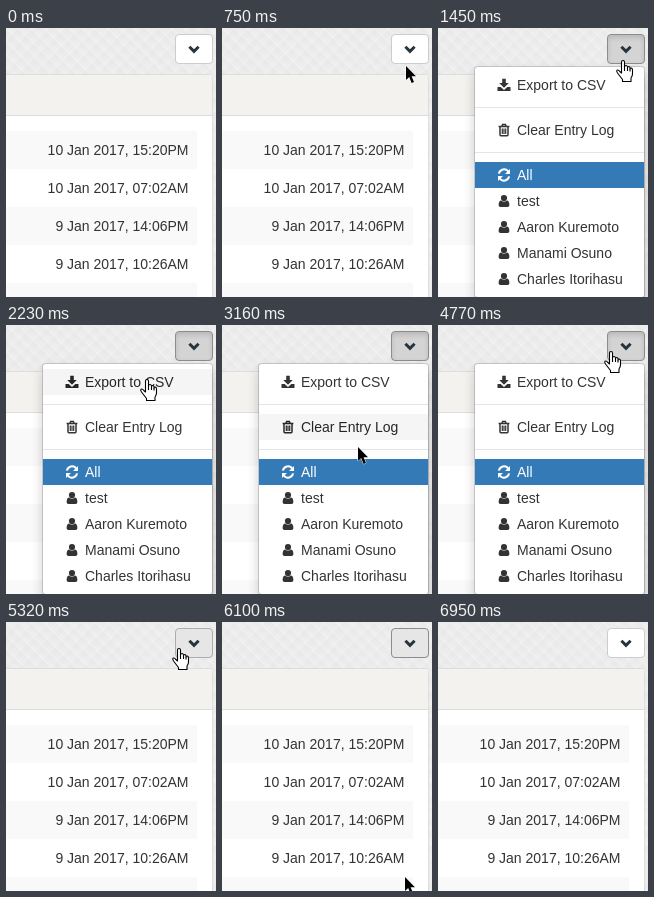
Animation of 210x269 px, one loop 7.1 s. Source, as an HTML page:

```html
<!DOCTYPE html>
<html lang="en">
<head>
<meta charset="utf-8">
<title>Entry log menu</title>
<style>
  html, body { margin: 0; width: 100%; height: 100%; overflow: hidden; }
  body {
    position: relative;
    font: 14px/20px "Liberation Sans", Arial, sans-serif;
    color: #333;
    background:
      repeating-linear-gradient(45deg, rgba(255,255,255,.14) 0 2px, transparent 2px 5px, rgba(0,0,0,.008) 5px 9px),
      repeating-linear-gradient(-45deg, rgba(255,255,255,.1) 0 2px, transparent 2px 6px, rgba(0,0,0,.008) 6px 11px),
      #ededed;
  }
  body * { box-sizing: border-box; }
  svg { position: absolute; overflow: visible; }

  .panel {
    position: absolute; left: -20px; top: 46px; width: 227px; height: 240px;
    background: #fff; border: 1px solid #ddd; border-radius: 4px; overflow: hidden;
  }
  .head { height: 41px; background: #f3f2ee; border-bottom: 1px solid #ddd; }
  .log { position: absolute; left: 0; top: 56px; width: 210px; }
  .log div { height: 38px; padding: 9px 8.5px 9px 0; text-align: right; white-space: nowrap; }
  .log div:nth-child(odd) { background: #f9f9f9; }

  .btn {
    position: absolute; left: 169px; top: 6px; width: 38px; height: 30px;
    background: #fff; border: 1px solid #ccc; border-radius: 4px;
  }
  .btn svg { left: 12px; top: 10px; }
  .btn.hover { background: #e6e6e6; border-color: #adadad; }
  .btn.focus { background: #e6e6e6; border-color: #8c8c8c; }
  .btn.down {
    background: #d4d4d4; border-color: #8c8c8c;
    box-shadow: inset 0 3px 5px rgba(0,0,0,.125);
  }

  .menu {
    position: absolute; left: 36px; top: 38px; width: 171px; height: 232px; padding: 5px 0;
    background: #fff; background-clip: padding-box;
    border: 1px solid rgba(0,0,0,.15); border-radius: 4px;
    box-shadow: 0 6px 12px rgba(0,0,0,.175);
  }
  .item { position: relative; height: 26px; padding: 3px 0 3px 42px; white-space: nowrap; }
  .item svg { left: 21.5px; top: 6px; fill: currentColor; stroke: none; }
  .item.hover { background: #f5f5f5; color: #262626; }
  .item.active { background: #337ab7; color: #fff; }
  .rule { height: 1px; margin: 9px 0; background: #e5e5e5; }
  .line { fill: none; stroke: currentColor; }

  #cursor { left: 0; top: 0; }
</style>
</head>
<body>
<svg width="0" height="0">
  <defs>
    <path id="download" fill-rule="evenodd" d="M5.2 .8h3.6v4.2h3L7 9.8 2.2 5h3zM.5 9h3.2L7 12.1l3.3-3.1h3.2v4H.5z"/>
    <g id="trash" class="line">
      <path stroke-width="1.5" d="M1.6 3.5h10.8M5 3.3 5.6 1.6h2.8L9 3.3M3 3.6v8.2q0 1 .9 1h6.2q.9 0 .9-1V3.6"/>
      <path stroke-width="1.2" d="M5.3 5.5v5.5M7 5.5v5.5M8.7 5.5v5.5"/>
    </g>
    <g id="half">
      <path class="line" stroke-width="2" d="M1.9 5.6a5.3 5.3 0 0 1 9.3-2.3"/>
      <path d="M13 1v5H8z"/>
    </g>
    <g id="refresh">
      <use href="#half"/>
      <use href="#half" transform="rotate(180 7 7)"/>
    </g>
    <g id="user">
      <circle cx="7" cy="4" r="3.1"/>
      <path d="M1.6 11.2Q1.6 6.6 4.3 6.4 7 8.8 9.7 6.4 12.4 6.6 12.4 11.2 12.4 13 10.5 13H3.5Q1.6 13 1.6 11.2z"/>
    </g>
  </defs>
</svg>

<div class="panel">
  <div class="head"></div>
  <div class="log">
    <div>10 Jan 2017, 15:20PM</div>
    <div>10 Jan 2017, 07:02AM</div>
    <div>9 Jan 2017, 14:06PM</div>
    <div>9 Jan 2017, 10:26AM</div>
    <div></div>
  </div>
</div>

<div class="btn" id="btn">
  <svg width="12" height="9"><path fill="none" stroke="#26343d" stroke-width="3" d="M1.4 1.8 6 6.3l4.6-4.5"/></svg>
</div>

<div class="menu" id="menu" hidden>
  <div class="item"><svg width="14" height="14"><use href="#download"/></svg>Export to CSV</div>
  <div class="rule"></div>
  <div class="item"><svg width="14" height="14"><use href="#trash"/></svg>Clear Entry Log</div>
  <div class="rule"></div>
  <div class="item active"><svg width="14" height="14"><use href="#refresh"/></svg>All</div>
  <div class="item"><svg width="14" height="14"><use href="#user"/></svg>test</div>
  <div class="item"><svg width="14" height="14"><use href="#user"/></svg>Aaron Kuremoto</div>
  <div class="item"><svg width="14" height="14"><use href="#user"/></svg>Manami Osuno</div>
  <div class="item"><svg width="14" height="14"><use href="#user"/></svg>Charles Itorihasu</div>
</div>

<svg id="cursor" width="18" height="23">
  <path id="arrow" fill="#000" stroke="#fff" stroke-width="1" paint-order="stroke"
    d="M0 0V14L3.2 11 5.6 17 8 16 5.6 10.2H10z"/>
  <g id="hand" transform="translate(-6 0)" stroke="#000" stroke-width="1.1" stroke-linejoin="round">
    <path fill="#fff" d="M5.5 13V2Q5.5.5 7 .5T8.5 2V7Q8.8 5.5 10 5.5T11.5 7V8Q11.7 6.5 12.8 6.5T14 8V9Q14.3 7.8 15.3 8.1 16.5 8.5 16.5 10V14Q16.5 16 15 18V21.5H6.5V19.5L1.5 13Q.2 11 1 10.2 2.5 9.5 3.8 11.5z"/>
    <path fill="none" d="M8.5 7v4M11.5 8v3M14 9v2.5"/>
  </g>
</svg>

<script>
  const LOOP = 7100;
  const SLACK = 8; // steps fall on 10 ms ticks, so they may come slightly early
  const START = [184, 272];
  // first step, last step, step count, destination
  const moves = [
    [210, 830, 9, 184, 32],
    [2000, 2230, 4, 140, 54],
    [2530, 2760, 4, 138, 105],
    [3080, 3620, 8, 123, 241],
    [3850, 4160, 5, 113, 134],
    [4460, 4770, 5, 172, 26],
    [5870, 6170, 5, 184, 275]
  ];
  const rowTops = [44, 89, 134, 160, 186, 212, 238];

  const $ = id => document.getElementById(id);
  const btn = $('btn'), menu = $('menu'), cursor = $('cursor');
  const arrow = $('arrow'), hand = $('hand');
  const items = [...menu.querySelectorAll('.item')];

  const ease = p => p < .5 ? 2 * p * p : 1 - 2 * (1 - p) ** 2;
  const mix = (a, b, p) => a + (b - a) * p;
  const rowAt = y => rowTops.findIndex(top => y > top && y <= top + 26);

  // Pointer position, plus the height the hover state has caught up with
  function pointer(t) {
    let from = START, x = from[0], y = from[1], seenY = y;
    for (const [t0, t1, n, tx, ty] of moves) {
      if (t < t0) break;
      const gap = (t1 - t0) / (n - 1);
      const done = Math.floor((t - t0 + SLACK) / gap) + 1;
      const step = t >= t1 ? n : Math.min(done, n - 1);
      const at = i => mix(from[1], ty, ease(i / n));
      x = mix(from[0], tx, ease(step / n));
      y = at(step);
      seenY = step === n ? y : at(step - 1);
      from = [tx, ty];
    }
    return { x: Math.round(x), y: Math.round(y), seenY };
  }

  function buttonState(t) {
    if (t < 830 || t >= 6950) return '';
    if (t < 1300) return 'hover';
    if (t < 5320) return 'down';
    return t < 5870 ? 'hover' : 'focus';
  }

  function draw(t) {
    const { x, y, seenY } = pointer(t);
    const open = t >= 1450 && t < 5320;
    const onButton = x >= 169 && y >= 6 && y < 36;
    const useHand = onButton || (open && rowAt(y) >= 0);
    const hot = open ? rowAt(seenY) : -1;

    btn.className = 'btn ' + buttonState(t);
    menu.hidden = !open;
    items.forEach((item, i) => item.classList.toggle('hover', i === hot && !item.matches('.active')));

    cursor.style.display = t < 210 || t >= 6170 ? 'none' : '';
    cursor.style.transform = `translate(${x}px, ${y}px)`;
    hand.style.display = useHand ? '' : 'none';
    arrow.style.display = useHand ? 'none' : '';
  }

  const begin = performance.now();
  function tick() {
    draw((performance.now() - begin) % LOOP);
    requestAnimationFrame(tick);
  }
  tick();
</script>
</body>
</html>
```
